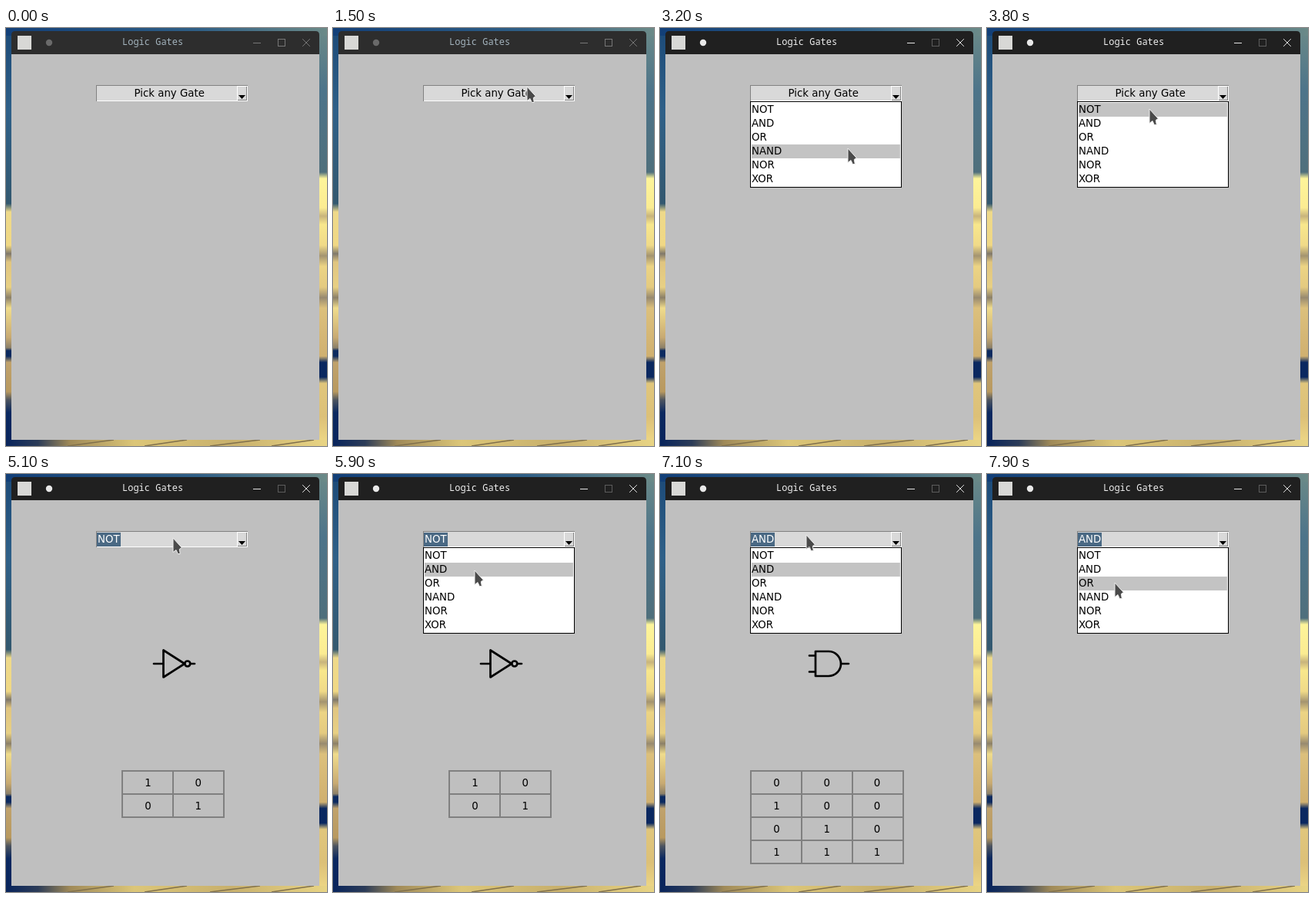
An HTML page that plays this animation: 417x542 px, repeating every 8000 ms.

```html
<!DOCTYPE html>
<html lang="en">
<head>
<meta charset="utf-8">
<title>Logic Gates</title>
<style>
  html, body { margin: 0; width: 100%; height: 100%; overflow: hidden; background: #bfbfbf; }
  svg { display: block; width: 417px; height: 542px; }
  text { font: 13.333px "DejaVu Sans", sans-serif; fill: #000; }
  .mid { text-anchor: middle; }
  .crisp { shape-rendering: crispEdges; }
  .gate { fill: none; stroke: #000; stroke-width: 2.7; stroke-linecap: round; stroke-linejoin: round; }
  .grid { fill: none; stroke: #808080; stroke-width: 2; }
  #bar { fill: #2d2d2d; }
  #title { font: 12px "Noto Sans Mono", monospace; fill: #a3b3bd; }
  #dot { fill: #6a6a6a; }
  .control { fill: none; stroke: #777; }
  .focused #bar { fill: #202020; }
  .focused #title { fill: #eee; }
  .focused #dot { fill: #e8e8e8; }
  .focused .control { stroke: #e4e4e4; }
  .focused .control.off { stroke: #5c5c5c; }
</style>
</head>
<body>
<svg id="stage" viewBox="0 0 417 542">
  <defs>
    <linearGradient id="wallLeft" x2="0" y2="1">
      <stop offset="0" stop-color="#1c4a78"/>
      <stop offset=".2" stop-color="#2f6088"/>
      <stop offset=".42" stop-color="#33586f"/>
      <stop offset=".44" stop-color="#eed98a"/>
      <stop offset=".52" stop-color="#f0d884"/>
      <stop offset=".54" stop-color="#80786a"/>
      <stop offset=".56" stop-color="#e0c580"/>
      <stop offset=".62" stop-color="#e8d084"/>
      <stop offset=".645" stop-color="#8c8068"/>
      <stop offset=".67" stop-color="#f0dc8c"/>
      <stop offset=".74" stop-color="#c8aa72"/>
      <stop offset=".765" stop-color="#8c8068"/>
      <stop offset=".772" stop-color="#0b2a60"/>
      <stop offset=".785" stop-color="#0b2a60"/>
      <stop offset=".8" stop-color="#c0a26c"/>
      <stop offset=".87" stop-color="#b8995f"/>
      <stop offset=".89" stop-color="#4c5460"/>
      <stop offset=".92" stop-color="#0a2860"/>
      <stop offset="1" stop-color="#08245c"/>
    </linearGradient>
    <linearGradient id="wallRight" x2="0" y2="1">
      <stop offset="0" stop-color="#6b8a88"/>
      <stop offset=".15" stop-color="#4d748a"/>
      <stop offset=".345" stop-color="#4f6f7c"/>
      <stop offset=".36" stop-color="#fdf49a"/>
      <stop offset=".43" stop-color="#fbec92"/>
      <stop offset=".45" stop-color="#c8b47c"/>
      <stop offset=".47" stop-color="#f8e78c"/>
      <stop offset=".52" stop-color="#f0da88"/>
      <stop offset=".545" stop-color="#a49470"/>
      <stop offset=".57" stop-color="#ecd484"/>
      <stop offset=".62" stop-color="#e4ca80"/>
      <stop offset=".645" stop-color="#988a70"/>
      <stop offset=".67" stop-color="#dcc07c"/>
      <stop offset=".785" stop-color="#d0b070"/>
      <stop offset=".8" stop-color="#0a2860"/>
      <stop offset=".835" stop-color="#0a2860"/>
      <stop offset=".85" stop-color="#e0c67c"/>
      <stop offset=".93" stop-color="#dcc078"/>
      <stop offset="1" stop-color="#f0da88"/>
    </linearGradient>
    <linearGradient id="wallTop">
      <stop offset="0" stop-color="#123f78"/>
      <stop offset=".6" stop-color="#2f5f86"/>
      <stop offset="1" stop-color="#6b8a88"/>
    </linearGradient>
    <linearGradient id="wallBottom">
      <stop offset="0" stop-color="#08245c"/>
      <stop offset=".1" stop-color="#2c3c58"/>
      <stop offset=".2" stop-color="#a08a58"/>
      <stop offset=".4" stop-color="#dcc678"/>
      <stop offset=".7" stop-color="#c8b06c"/>
      <stop offset="1" stop-color="#e8d484"/>
    </linearGradient>
  </defs>

  <rect width="8" height="542" fill="url(#wallLeft)"/>
  <rect x="406" width="11" height="542" fill="url(#wallRight)"/>
  <rect width="417" height="10" fill="url(#wallTop)"/>
  <rect y="534" width="417" height="8" fill="url(#wallBottom)"/>
  <path d="M80 542L140 534M180 542L235 534M265 542L330 534M345 542L400 534" stroke="#80704c" stroke-width="1.500"/>

  <path id="bar" d="M7 34V9q0-5 5-5H402q5 0 5 5V34z"/>
  <rect x="7" y="34" width="400" height="500" fill="#bfbfbf"/>
  <rect x="15" y="10" width="18" height="18" fill="#d8d8d6"/>
  <circle id="dot" cx="56" cy="19" r="4.200"/>
  <text id="title" x="151" y="22">Logic Gates</text>
  <path class="control" d="M321 19.500H331"/>
  <rect class="control off" x="353.500" y="14.500" width="9" height="9"/>
  <path class="control" stroke-linecap="square" d="M385.500 14.500L394.500 23.500M394.500 14.500L385.500 23.500"/>

  <g class="crisp">
    <rect x="117" y="74" width="197" height="21" fill="#fff"/>
    <path d="M117 74H314V75H118V95H117z" fill="#828282"/>
    <rect x="118" y="75" width="195" height="19" fill="#d9d9d9"/>
    <rect x="300" y="75" width="13" height="19" fill="#828282"/>
    <path d="M300 94V75H313V76H301V94z" fill="#fff"/>
    <rect x="301" y="76" width="11" height="17" fill="#d9d9d9"/>
  </g>
  <path d="M302 87H311L306.500 92z"/>
  <rect id="selection" class="crisp" x="118" y="76" width="31" height="18" fill="#4a6984"/>
  <text id="entry" y="89"></text>

  <g id="notView">
    <g class="gate">
      <path d="M192 246H204M240 246H245M204.500 228.500V263.500L232 246z"/>
      <circle cx="235.800" cy="246" r="3.500"/>
    </g>
  </g>
  <g id="andView">
    <path class="gate" d="M202 230H219A16 16 0 0 1 219 262H202zM194 235.500H202M194 256.500H202M235 246H245"/>
  </g>

  <g id="list">
    <rect class="crisp" x="117.500" y="95.500" width="196" height="111" fill="#fff" stroke="#000"/>
    <rect id="highlight" class="crisp" x="119" width="193" height="18" fill="#c3c3c3"/>
  </g>
  <path id="cursor" d="M0 0V18.500L4 15.500L6.300 20.500H9.300L8.300 14.500L11.300 12.500z"
        fill="#4a4a4a" stroke="#eee" stroke-linejoin="round"/>
</svg>
<script>
const LOOP = 8000, STEP = 100;
const $ = id => document.getElementById(id);

function add(parent, tag, attrs, text = "") {
  const node = document.createElementNS("http://www.w3.org/2000/svg", tag);
  for (const name in attrs) node.setAttribute(name, attrs[name]);
  node.textContent = text;
  parent.append(node);
}

function addTable(parent, left, rows) {
  const cols = rows[0].length, width = 66, height = 30, top = 385;
  let lines = "";
  for (let c = 0; c <= cols; c++) lines += `M${left + c * width} ${top - 1}v${rows.length * height + 2}`;
  for (let r = 0; r <= rows.length; r++) lines += `M${left - 1} ${top + r * height}h${cols * width + 2}`;
  add(parent, "path", { d: lines, class: "grid crisp" });
  rows.forEach((row, r) => [...row].forEach((bit, c) =>
    add(parent, "text", { x: left + 33.5 + c * 65.3, y: top + 20 + r * height, class: "mid" }, bit)));
}

addTable($("notView"), 151, ["10", "01"]);
addTable($("andView"), 118, ["000", "100", "010", "111"]);
["NOT", "AND", "OR", "NAND", "NOR", "XOR"].forEach((name, i) =>
  add($("list"), "text", { x: 119, y: 110 + 18 * i }, name));

// Pointer path: time, x, y
const path = [
  [300, 406, 0], [400, 335, 72], [500, 215, 150], [600, 102, 180], [700, 122, 150], [800, 150, 104],
  [900, 150, 104], [1100, 137, 80], [1400, 269, 56], [1600, 235, 95], [1800, 169, 77], [1900, 245, 76], [2000, 289, 79],
  [2500, 289, 79], [3000, 255, 104], [3400, 232, 207], [3800, 211, 105], [3900, 189, 102],
  [4300, 164, 100], [4500, 164, 100], [4800, 195, 86], [5100, 217, 83],
  [5500, 217, 83], [5700, 205, 100], [5900, 184, 125],
  [6300, 184, 125], [6800, 190, 79], [7100, 190, 79], [7500, 176, 102], [7800, 176, 102], [7900, 166, 141]
];

function pointerAt(t) {
  const next = path.findIndex(key => key[0] > t);
  if (next < 0) return path.at(-1).slice(1);
  const [t0, x0, y0] = path[next - 1], [t1, x1, y1] = path[next];
  const k = (t - t0) / (t1 - t0);
  return [Math.round(x0 + (x1 - x0) * k), Math.round(y0 + (y1 - y0) * k)];
}

const within = (t, ...spans) => spans.some(([from, to]) => t >= from && t < to);
const show = (id, on) => $(id).setAttribute("visibility", on ? "visible" : "hidden");

function highlightedRow(t, y) {
  if (t >= 7000 && t < 7900) return 1;
  return Math.max(0, Math.min(5, Math.floor((y - 97) / 18)));
}

function draw(t) {
  $("stage").classList.toggle("focused", t >= 2200);

  const chosen = t >= 6300 ? "AND" : t >= 4500 ? "NOT" : "";
  const entry = $("entry");
  entry.textContent = chosen || "Pick any Gate";
  entry.setAttribute("x", chosen ? 119 : 166.5);
  entry.style.fill = chosen ? "#fff" : "#000";
  show("selection", chosen);
  show("notView", within(t, [4500, 6200]));
  show("andView", within(t, [6300, 7900]));
  show("list", within(t, [2200, 4500], [5400, 6300], [7000, LOOP]));

  show("cursor", t >= 300);
  if (t < 300) return;
  const [x, y] = pointerAt(t);
  $("cursor").setAttribute("transform", `translate(${x} ${y})`);
  $("highlight").setAttribute("y", 97 + 18 * highlightedRow(t, y));
}

const start = performance.now();
function tick() {
  const elapsed = (performance.now() - start) % LOOP;
  draw(Math.floor(elapsed / STEP) * STEP);
  requestAnimationFrame(tick);
}
tick();
</script>
</body>
</html>
```
